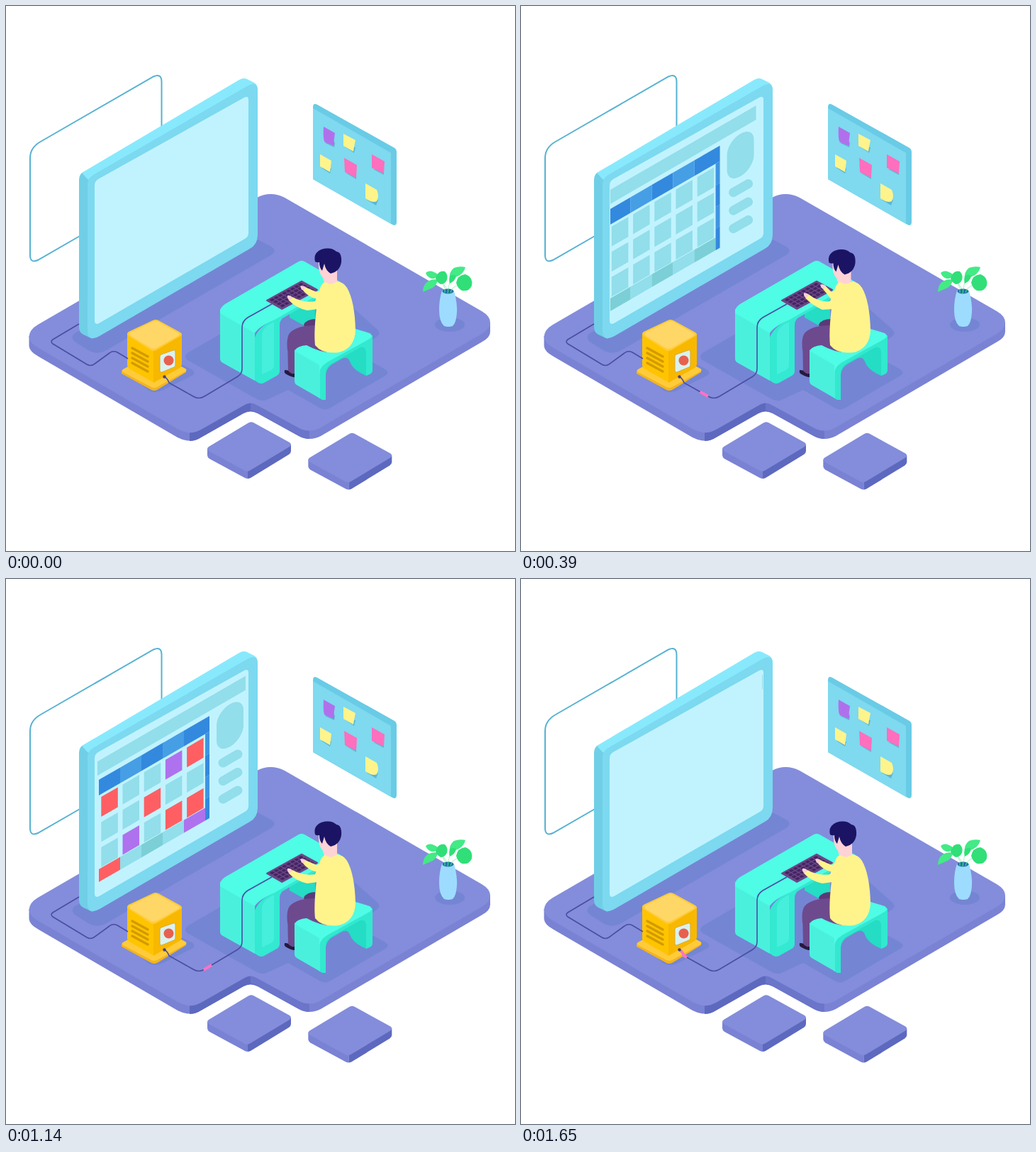
An HTML page that plays this animation: 718 by 768 pixels, repeating every 1680 ms.

```html
<!DOCTYPE html>
<html lang="en">
<head>
<meta charset="utf-8">
<title>Workspace</title>
<style>
html, body { margin: 0; width: 100%; height: 100%; overflow: hidden; background: #fff; }
svg { display: block; width: 100%; height: 100%; }
.r { stroke-linejoin: round; }
</style>
</head>
<body>
<svg viewBox="0 0 718 768" fill="none">
  <defs>
    <clipPath id="screen"><path d="M126 252Q126 246 131 243L337 129Q341 127 341 132V322L133 446Q126 449 126 444Z"/></clipPath>
  </defs>

  <!-- floor -->
  <path fill="#7a82d4" d="M32.500 465V479Q33 487 46 494L242 608Q259 617 275 608L335 574Q345 569 355 574L413 606Q428 614 444 606L672 473Q683 467 683 459V446Z"/>
  <path fill="#5d69be" d="M259 598V613Q268 613 275 608L335 574Q345 568 355 574V556H335Z"/>
  <path fill="#6b75ca" d="M345 556V570Q350 570 355 574L413 606Q420 610 428 610V596Z"/>
  <path fill="#838ddb" d="M32.500 466Q33 456 45 449L354 270Q373 260 393 270L671 430Q683 437 683 446Q683 455 671 462L444 594Q428 603 412 594L355 563Q345 556 335 563L275 597Q259 606 242 596L46 482Q33 475 32.500 466Z"/>
  <g fill="#7485d4">
    <path d="M97 461L355 329L374 339Q383 345 374 351L140 486Q128 492 116 485L97 473Q90 467 97 461Z"/>
    <path d="M256 489L330 446L470 408L523 455Q530 461 523 466L517 470V502L535 512Q542 516 535 521L458 566Q450 571 442 566L398 541L370 554Q361 559 352 553L256 499Q250 494 256 489Z"/>
    <path d="M166 512L210 487L262 512Q269 517 262 521L222 541Q209 547 200 541Z"/>
    <ellipse cx="626" cy="449" rx="21" ry="10"/>
  </g>

  <!-- stepping tiles -->
  <g id="tile">
    <path fill="#7a82d4" d="M284 624V633Q284 636 287 638L337 665Q339 666 341 666V650Z"/>
    <path fill="#5d69be" d="M402 618V627Q402 630 399 632L345 665Q343 666 341 666V650Z"/>
    <path fill="#838ddb" d="M286 621L341 588Q345 585 349 587L400 615Q404 618 400 621L345 654Q341 657 337 655L286 627Q282 624 286 621Z"/>
  </g>
  <use href="#tile" x="142.300" y="15.500"/>

  <!-- outline panel and monitor -->
  <path stroke="#57b2d2" stroke-width="2" d="M219.500 180V107Q219.500 94.500 208 99.500L49 191Q34 199.500 34 214V351Q34 363 45 358L106 323"/>
  <path fill="#70cfe6" d="M103 245Q103 237 109 234L122 240V469L109 463Q103 460 103 452Z"/>
  <path fill="#88e9fd" d="M107 235L329 104Q336 100 342 104L350 108Q355 111 355 118L122 248L115 244Z"/>
  <path fill="#7cd9ef" d="M115 251Q115 243 123 238L340 113Q355 105 355 119V322Q355 336 344 342L132 465Q115 474 115 458Z"/>
  <path fill="#c1f3ff" d="M125 253Q125 247 130 244L336 129Q342 126 342 132V320Q342 325 337 328L133 446Q125 451 125 443Z"/>
  <g clip-path="url(#screen)"><g id="page"></g></g>

  <!-- notice board -->
  <path fill="#69cbe6" d="M433 143Q433 136 439 139L548 200Q551 202 551 206V304Q551 311 545 308L433 244Z"/>
  <path fill="#7fd9ef" d="M433 144L543 207V307L433 244Z"/>
  <g fill="#4aa5c4" opacity=".65">
    <path d="M450 193L463 199L464 192ZM478 198L491 207L493 199ZM445 228L457 236L459 229ZM479 235L494 244V236ZM518 230L533 238V231ZM509 273L522 281L525 273Z"/>
  </g>
  <path fill="#b070ec" d="M448 170L464 179Q462 188 463 197L450 192Q447 189 448 170Z"/>
  <path fill="#fff48b" d="M476 180L493 189Q491 198 490 205L476 197ZM443 209L459 218Q458 227 457 234L443 226ZM507 250L523 259Q527 268 523 275Q517 278 507 271Z"/>
  <path fill="#ff6fbe" d="M477 214L495 224L494 242L478 234ZM516 209L534 219L533 236L516 228Z"/>

  <!-- plant -->
  <g stroke="#b6f3d1" stroke-width="1.200"><path d="M623 403Q620 390 604 380M624 403Q624 385 636 375M625 403Q632 394 646 390M621 402Q614 388 615 384"/></g>
  <g fill="#43ea86">
    <path d="M592 376Q598 370 609 378Q608 385 600 384Q594 382 592 376Z"/>
    <path d="M626 386Q624 375 632 369Q640 366 648 368Q646 376 639 380Q632 383 626 386Z"/>
    <path d="M588 403Q588 393 595 388Q602 384 609 386Q608 393 602 397Q595 400 588 403Z"/>
  </g>
  <g fill="#30df78">
    <path d="M608 379Q611 373 619 374Q624 379 622 386Q619 392 613 392Q606 388 606 383Z"/>
    <path d="M626 391Q624 384 627 380Q632 377 635 381Q633 388 626 391Z"/>
    <path d="M635 390Q637 379 648 378Q659 382 657 394Q653 403 643 401Q637 398 635 390Z"/>
  </g>
  <path fill="#9ddcff" d="M615 401H632Q637 420 636 432Q635 447 630 451Q624 453 618 451Q611 445 611 428Q611 413 615 401Z"/>
  <ellipse cx="623.500" cy="402" rx="8" ry="3.500" fill="#2272a3"/>
  <path stroke="#43ea86" d="M619 404V399M623 405L624 398M627 404L629 399"/>

  <!-- desk -->
  <path fill="#25dcc4" d="M400 431L436 410V451Q427 453 418 449L400 439Z"/>
  <path fill="#33e9d1" d="M350 470Q354 455 372 445L472 389V393L390 440Q386 444 386 450V514Q386 519 382 521L364 531Q360 533 356 531L350 527Z"/>
  <path fill="#4bf0dd" d="M302 427L351 455V528L306 503Q302 501 302 497Z"/>
  <path fill="#4ffce5" d="M302 429Q303 424 309 420L413 360Q417 358 421 360L472 389L379 442Q356 452 351 461L302 433Z"/>
  <path fill="#46efdc" d="M361 462Q363 454 371 449L378 445V506Q378 511 374 513L361 519Z"/>

  <!-- keyboard -->
  <path class="r" fill="#6b4687" stroke="#6b4687" stroke-width="2" d="M368 415L417 388L439 400L389 427Z"/>
  <g id="keys" fill="#432460" transform="matrix(50 -27 22 12.500 367.500 414.500)"></g>

  <!-- generator box -->
  <path fill="#f3b41f" d="M163 515V518L205 541Q209 543 213 541L254 516V512Z"/>
  <path fill="#ffcb3a" d="M165 512L209 488L253 511Q256 513 253 515L213 537Q209 539 205 537L165 516Q162 514 165 512Z"/>
  <path fill="#ffc400" d="M171 461L209 482V531L174 511Q171 509 171 506Z"/>
  <path fill="#f8b800" d="M248 462L208 482V531L245 510Q248 508 248 505Z"/>
  <path fill="#ffcb36" d="M173 459L207 443Q211 441 215 443L246 460Q250 463 246 465L212 485Q208 487 204 485L173 465Q169 462 173 459Z"/>
  <path fill="#ffd766" d="M176 460L207 445Q211 443 215 445L243 461Q246 463 243 465L212 482Q208 484 204 482L176 465Q173 462 176 460Z"/>
  <g stroke="#d39b00" stroke-width="3.400" stroke-linecap="round"><path d="M178 482L200 494M178 489L200 501M178 496L200 508M178 503L200 515"/></g>
  <path class="r" fill="#d9f2ee" stroke="#d6a833" stroke-width="1" d="M217 494Q217 492 219 491L236 485Q239 484 239 487V506Q239 508 237 509L220 516Q217 517 217 514Z"/>
  <circle cx="229.500" cy="499.500" r="7" fill="#e8604f"/>

  <!-- cables -->
  <g stroke="#4a4da3" stroke-width="1.600">
    <path d="M103 448L66 470Q62 473 66 476L114 505Q119 508 124 505L146 489Q151 485 157 488L172 497"/>
    <path id="wire" d="M375 420L341 439Q333 444 333 453V511Q333 518 327 522L280 550Q272 555 264 550L230 531Q228 525 223 522"/>
  </g>
  <g id="pulses"></g>
  <circle cx="223.500" cy="522.500" r="2.200" fill="#4a4088"/>

  <!-- legs and bench -->
  <path fill="#241a3f" d="M393 513Q399 513 407 517V523Q402 523 394 518Q392 516 393 513Z"/>
  <path fill="#6d4a8e" d="M397 470L398 514Q402 519 407 518L412 470Z"/>
  <path fill="#5b3a79" d="M420 449Q424 441 438 441V456L422 454Z"/>
  <path fill="#25dcc4" d="M451 520V506L508 470V521Q489 513 485 501Q482 493 474 497L460 505Q452 510 451 520Z"/>
  <path fill="#32e8cf" d="M441 514Q442 503 453 497L505 466L517 464V513Q517 517 513 519L508 521V488Q507 478 498 482L459 504Q451 509 451 518V555H446L441 552Z"/>
  <path fill="#4bf0dd" d="M407 484L443 505V553L410 534Q407 532 407 529Z"/>
  <path fill="#4ffce5" d="M407 487Q408 482 414 478L486 453L513 461Q519 465 513 469L453 502Q443 508 442 517V506L407 486Z"/>
  <path fill="#6d4a8e" d="M436 450Q411 450 401 460Q395 466 397 485H407Q412 479 424 478Q444 489 462 488L466 465Z"/>

  <!-- upper body -->
  <g id="head">
    <path fill="#ffd2d6" d="M441 360Q440 376 447 383L449 390Q458 398 467 389L467 368L452 356Z"/>
    <path fill="#1b1464" d="M436 360Q433 348 445 343Q458 339 466 346Q474 347 473 361Q471 374 458 377Q451 373 449 363L446 373Q442 369 442 361Q438 362 436 360Z"/>
  </g>
  <path id="farArm" fill="#fff48b"/>
  <path id="farHand" fill="#ffd2d6"/>
  <path fill="#fff48b" d="M444 395Q447 389 451 389Q458 395 467 388Q476 389 481 397Q492 416 493 457Q492 482 470 488Q446 491 436 478Q434 460 438 426L436 416Z"/>
  <path id="nearArm" fill="#fff48b"/>
  <path id="nearHand" fill="#ffd2d6"/>
</svg>
<script>
const LOOP = 1680, STEP = 30, SLOPE = 0.577;
const RED = '#ff5f63', PURPLE = '#ae72ee', PALE = '#92deea';
const $ = id => document.getElementById(id);

function add(parent, tag, attrs) {
  const el = document.createElementNS('http://www.w3.org/2000/svg', tag);
  for (const k in attrs) el.setAttribute(k, attrs[k]);
  return parent.appendChild(el);
}
const rect = (parent, x, y, width, height, fill, rx = 0) =>
  add(parent, 'rect', { x, y, width, height, fill, rx });

// Page on the monitor, drawn flat and sheared by the group
const page = $('page'), cells = [];
rect(page, -2, -27, 209, 20, PALE);
for (let c = 0; c < 5; c++) {
  rect(page, 30 * c, 0, c == 4 ? 36 : 30, 22, c % 2 ? '#469ee5' : '#3389de');
}
for (let r = 0; r < 4; r++) {
  cells.push([]);
  for (let c = 0; c < 5; c++) {
    const foot = r == 3, base = foot && c % 2 == 0 ? '#7ccfd6' : PALE;
    const el = foot ? rect(page, 30 * c, 126, 30, 18, base)
                    : rect(page, 3.3 + 30.2 * c, 26 + 35.5 * r, 23.5, 28, base);
    cells[r].push({ el, base });
  }
  rect(page, 150, 22 + 30.5 * r, 6, 30.5, r % 2 ? '#3389de' : '#3f95e2');
}
rect(page, 166, 0, 38, 60, PALE, 19);
for (let i = 0; i < 3; i++) {
  add(page, 'path', {
    d: `M175 ${77 + 25.5 * i}h21`, stroke: PALE, 'stroke-width': 13,
    'stroke-linecap': 'round', 'vector-effect': 'non-scaling-stroke'
  });
}

// Cells fill one after another: row, column, colour
const fills = [
  [3, 0, RED], [2, 3, RED], [0, 0, RED], [2, 1, PURPLE], [1, 2, RED],
  [0, 3, PURPLE], [2, 4, RED], [0, 4, RED], [3, 4, PURPLE]
];

for (let r = 0; r < 4; r++) {
  for (let c = 0; c < 8; c++) rect($('keys'), 0.05 + c * 0.115, 0.08 + r * 0.22, 0.085, 0.16);
}

const pulses = [0, 1, 2, 3].map(() => add($('pulses'), 'path', {
  d: $('wire').getAttribute('d'), stroke: '#ff72c3', 'stroke-width': 4, 'stroke-dasharray': '13 1000'
}));

// Smooth interpolation through [time, value] keys
function ease(keys, t) {
  const i = keys.findIndex(k => k[0] > t);
  if (i < 0) return keys[keys.length - 1][1];
  const [t0, a] = keys[i - 1], [t1, b] = keys[i];
  return a + (b - a) * (1 - Math.cos(Math.PI * (t - t0) / (t1 - t0))) / 2;
}
const nod = [[0, 0], [390, 1], [630, 0], [870, 1], [1110, 0]];
const nearTap = [[0, 0], [180, 1], [330, 0.1], [480, 0.8], [540, 0.7], [630, 1], [810, 0], [990, 1], [1140, 0]];
const farTap = nod;

function slide(t) {
  if (t < 518) return -212 * (1 - t / 518) ** 2.5;
  return t > 1197 ? 211 * ((t - 1197) / 453) ** 2.5 : 0;
}

function pose(t) {
  const n = ease(nod, t);
  $('head').setAttribute('transform', `translate(${-1.5 * n} ${1.5 * n})`);

  const a = ease(nearTap, t), x = 400 + 6 * a, y = 411 - 10 * a;
  $('nearArm').setAttribute('d',
    `M446 414L437 416Q${420 + 2 * a} ${419 - 2 * a} ${x + 4} ${y - 1}L${x - 1} ${y + 4}Q${x + 10} ${y + 15} 425 ${429 - 3 * a}L440 427Z`);
  $('nearHand').setAttribute('d',
    `M${x - 3} ${y - 3}Q${x - 1} ${y - 4} ${x + 4} ${y - 1}L${x} ${y + 4}Q${x - 4} ${y + 1} ${x - 3} ${y - 3}Z`);

  const b = ease(farTap, t), u = 418 + 7 * b, v = 397 - 2 * b;
  $('farArm').setAttribute('d',
    `M446 400L438 403L${u + 4} ${v - 1}L${u + 1} ${v + 4}Q${u + 9} ${v + 13} 436 412L446 414Z`);
  $('farHand').setAttribute('d',
    `M${u - 3} ${v - 2}Q${u} ${v - 4} ${u + 5} ${v - 1}L${u + 1} ${v + 4}Q${u - 2} ${v + 2} ${u - 3} ${v - 2}Z`);
}

function draw(t) {
  const dx = slide(t);
  page.setAttribute('transform', `matrix(1 ${-SLOPE} 0 1 ${131 + dx} ${283 - SLOPE * dx})`);
  fills.forEach(([r, c, color], i) => {
    const { el, base } = cells[r][c];
    el.setAttribute('fill', t >= 570 + 60 * i ? color : base);
  });
  pulses.forEach((p, i) => {
    const s = 0.574 * (t - 33 - 400 * i);
    p.setAttribute('visibility', s > -6 && s < 260 ? 'visible' : 'hidden');
    p.setAttribute('stroke-dashoffset', 6.5 - s);
  });
  pose(t);
}

const start = performance.now();
function tick() {
  const t = (performance.now() - start) % LOOP;
  draw(Math.floor(t / STEP) * STEP);
  requestAnimationFrame(tick);
}
draw(0);
requestAnimationFrame(tick);
</script>
</body>
</html>
```
